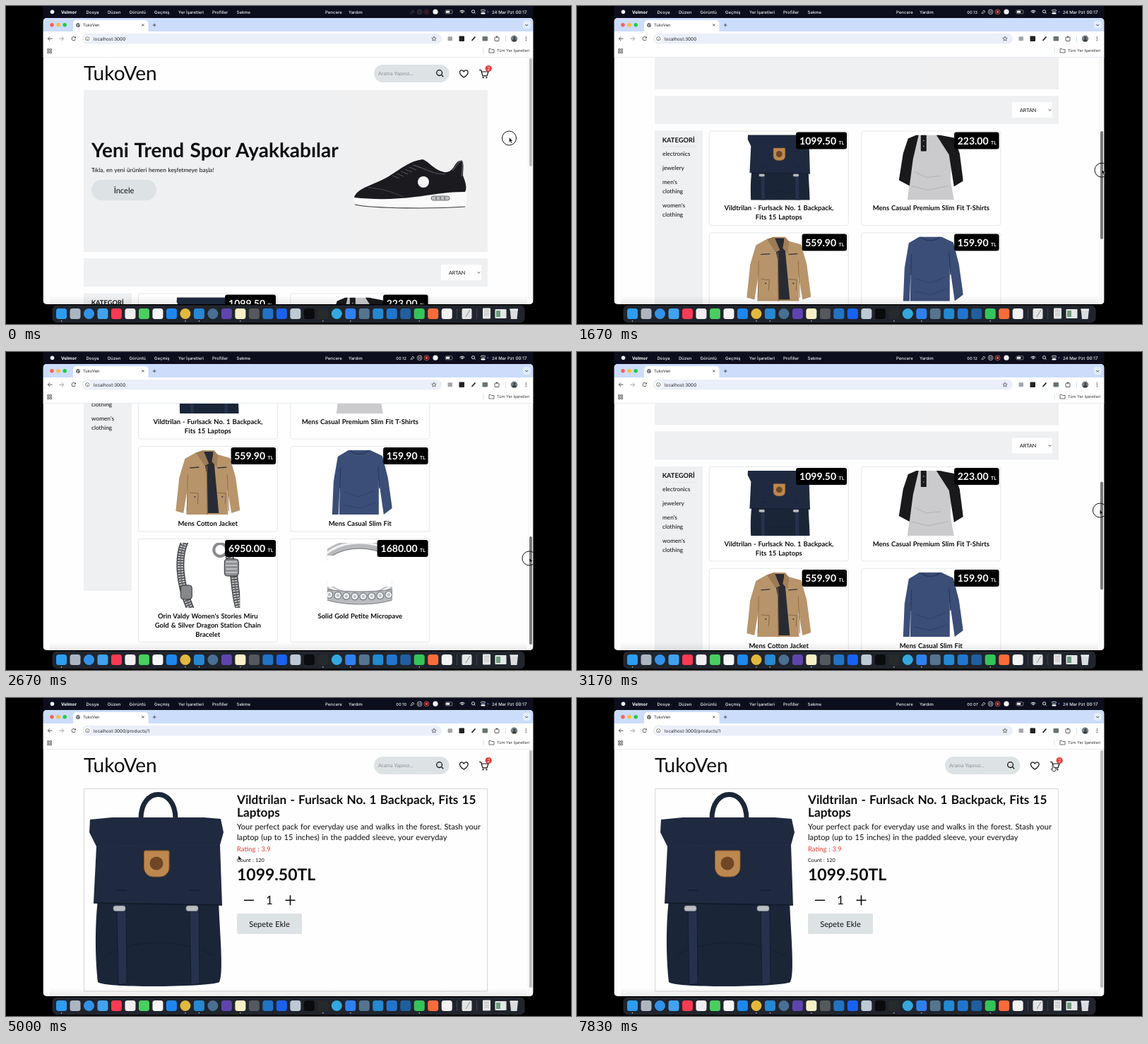
An HTML page with a canvas for the animation above (8000 ms loop, 800 px wide and 450 px high).

```html
<!DOCTYPE html>
<html lang="tr">
<head>
<meta charset="utf-8">
<title>TukoVen</title>
<style>
html, body { margin: 0; width: 100%; height: 100%; overflow: hidden; background: #000; }
canvas { position: absolute; left: 0; top: 0; width: 800px; height: 450px; }
</style>
</head>
<body>
<canvas id="stage"></canvas>
<script>
const stage = document.getElementById('stage');
const c = stage.getContext('2d');
const dpr = window.devicePixelRatio || 1;
stage.width = 800 * dpr;
stage.height = 450 * dpr;

const LOOP = 8000;
const SHOP = 'Lato, sans-serif';
const UI = 'Inter, sans-serif';
const INK = '#0d0d0f', PANEL = '#eef0f2', PILL = '#dde2e5', NAVY = '#1c2639';

// ---------- drawing helpers ----------
function text(s, x, y, size, color = INK, weight = 400, align = 'left', font = SHOP) {
  c.font = `${weight} ${size}px ${font}`;
  c.wordSpacing = font === SHOP ? size * 0.06 + 'px' : '0px';
  c.textAlign = align;
  c.fillStyle = color;
  c.fillText(s, x, y);
}
const ui = (s, x, y, size, color, weight = 400) => text(s, x, y, size, color, weight, 'left', UI);

function paint(fill, stroke, w = 1) {
  if (fill) { c.fillStyle = fill; c.fill(); }
  if (stroke) { c.strokeStyle = stroke; c.lineWidth = w; c.stroke(); }
}
function rect(x, y, w, h, fill, r = 0, stroke, lw) {
  c.beginPath();
  c.roundRect(x, y, w, h, r);
  paint(fill, stroke, lw);
}
function dot(x, y, r, fill, stroke, lw) {
  c.beginPath();
  c.arc(x, y, r, 0, 7);
  paint(fill, stroke, lw);
}
function poly(p, fill, stroke, lw) {
  c.beginPath();
  for (let i = 0; i < p.length; i += 2) c.lineTo(p[i], p[i + 1]);
  if (fill) c.closePath();
  paint(fill, stroke, lw);
}
function curve(x, y, segs, fill, stroke, lw) {
  c.beginPath();
  c.moveTo(x, y);
  for (const s of segs) c.bezierCurveTo(...s);
  paint(fill, stroke, lw);
}
function inside(x, y, w, h, draw) {
  c.save();
  c.beginPath();
  c.rect(x, y, w, h);
  c.clip();
  draw();
  c.restore();
}
function at(x, y, draw, scale = 1) {
  c.save();
  c.translate(x, y);
  c.scale(scale, scale);
  draw();
  c.restore();
}
function glass(x, y, r, color, w) {
  dot(x, y, r, null, color, w);
  poly([x + r * .72, y + r * .72, x + r * 1.45, y + r * 1.45], null, color, w);
}

// Smooth path through [time, ...values] keys, resting at turning points
function follow(keys, t, n) {
  const last = keys.length - 1;
  if (t <= keys[0][0]) return keys[0][n];
  if (t >= keys[last][0]) return keys[last][n];
  let i = 0;
  while (t >= keys[i + 1][0]) i++;
  const rate = k => k < 0 || k >= last ? 0 : (keys[k + 1][n] - keys[k][n]) / (keys[k + 1][0] - keys[k][0]);
  const slope = k => {
    const a = rate(k - 1), b = rate(k);
    return a * b > 0 ? 2 * a * b / (a + b) : 0;
  };
  const h = keys[i + 1][0] - keys[i][0], u = (t - keys[i][0]) / h, v = 1 - u;
  return keys[i][n] * v * v * (1 + 2 * u) + keys[i + 1][n] * u * u * (3 - 2 * u)
    + h * u * v * (slope(i) * v - slope(i + 1) * u);
}

const POINTER = [
  [0, 712.5, 186], [400, 712.5, 186], [900, 741, 124], [1170, 742, 117], [1330, 742, 138],
  [1500, 742.5, 184], [1670, 743, 231], [2170, 742, 305], [2400, 741, 306], [2670, 741, 291],
  [3330, 740, 214], [3450, 735, 215], [3830, 329, 223], [5000, 329, 223], [5900, 398, 304],
  [6750, 398, 304], [7660, 674, 95]
];
const SCROLL = [[1170, 0], [1330, 38], [1500, 122], [1670, 229.5], [2170, 417.5], [2670, 417.5], [3330, 215]];
const SLIDE = [[600, 0], [1130, 1]];

// ---------- pictures ----------
function shoe(body, sole, trim, mark) {
  curve(493, 270, [[490, 280, 500, 285, 520, 285], [560, 287, 620, 287, 648, 284],
    [655, 282, 653, 262, 649, 258], [600, 256, 530, 260, 493, 270]], sole);
  curve(493, 271, [[497, 256, 525, 253, 545, 239], [560, 230, 572, 219, 590, 217],
    [600, 221, 606, 232, 620, 235], [634, 237, 634, 222, 642, 219], [650, 218, 647, 232, 647, 240],
    [651, 250, 653, 258, 650, 263], [620, 263, 600, 268, 580, 270], [550, 274, 520, 274, 493, 271]], body);
  curve(632, 233, [[638, 226, 640, 220, 645, 219], [648, 220, 646, 231, 645, 241]], null, trim, 1.4);
  curve(513, 257, [[530, 258, 548, 263, 562, 270]], null, trim, .8);
  curve(576, 225, [[592, 228, 600, 238, 622, 238]], null, trim, 1.2);
  for (let i = 0; i < 6; i++) poly([547 + i * 6, 240 - i * 3, 557 + i * 6, 244 - i * 3], null, trim, 1);
  dot(591, 249, 8, mark);
}
function blackShoe() {
  shoe('#1b1b1f', '#fafafa', '#55555a', '#f5f5f5');
  curve(494, 281, [[520, 287, 610, 287, 650, 284]], null, '#3a3a3c', 1.2);
  rect(602, 269, 26, 6, '#bfc1c2', 3, '#55575a', .8);
  c.fillStyle = '#88898b';
  for (let i = 0; i < 3; i++) c.fillRect(608 + i * 6, 270, 2, 4);
}
function whiteShoe() {
  shoe('#e2e3e4', '#f3f3f3', '#333438', '#303136');
  curve(494, 270, [[498, 280, 530, 284, 560, 285], [600, 287, 630, 286, 652, 270],
    [648, 283, 630, 288, 600, 286], [560, 287, 500, 287, 494, 270]], '#25262b');
  curve(494, 268, [[540, 271, 590, 262, 650, 262]], null, '#a5a6a8', 1);
  for (let i = 0; i < 9; i++) rect(607 + i * 4.4, 242 - i * .5, 2.4, 4, '#333438');
}

function bag() {
  curve(191, 171, [[191, 125, 240, 125, 240, 171]], null, NAVY, 7);
  curve(130, 285, [[125, 330, 127, 375, 130, 402], [140, 411, 290, 409, 302, 402],
    [309, 390, 302, 325, 301, 285]], '#1b2538');
  poly([119, 172, 150, 169, 280, 169, 304, 171, 308, 190, 303, 208, 306, 293, 124, 290, 128, 210, 118, 190], '#1f2a40');
  poly([124, 290, 306, 293], null, '#111927', 1.5);
  poly([128, 210, 303, 208], null, '#25314a', .7);
  curve(140, 365, [[180, 340, 250, 340, 294, 365]], null, '#151e2e', 1);
  for (const x of [157, 260]) {
    poly([x, 296, x + 13, 296, x + 14, 404, x + 2, 406], '#26324b', '#121a29', .8);
    rect(x - 5, 294, 17, 7.5, '#b9bdc0', 3, '#777b80', .7);
    poly([x, 272, x + 14, 272], null, '#111927', 1);
  }
  rect(195.5, 216, 35.5, 37, '#bd8850', [2, 2, 13, 13], '#8c5c2b', 1);
  dot(213, 234, 9.5, '#6f4725');
}

const thumbs = {
  bag: () => at(99 - 213 * .47, 33 - 234 * .47, bag, .47),
  tee() {
    poly([76, 6, 114, 6, 128, 38, 126, 70, 131, 98, 65, 98, 69, 68, 70, 38], '#cbcbcd');
    poly([78, 6, 66, 11, 59, 32, 53, 70, 68, 78, 73, 40, 81, 6], '#19191b');
    poly([110, 6, 131, 10, 139, 32, 144, 71, 131, 79, 124, 34, 106, 6], '#19191b');
    rect(84, 6, 8, 23, '#1a1a1c', 1);
    dot(88, 14, .7, '#ddd');
    dot(88, 22, .7, '#ddd');
    poly([75, 58, 92, 66, 112, 64], null, '#b4b4b7', 1);
    poly([70, 78, 94, 84, 123, 78], null, '#b4b4b7', 1);
  },
  jacket() {
    poly([82, 9, 92, 6, 107, 6, 112, 12, 130, 17, 138, 45, 144, 91, 132, 95, 126, 60, 127, 97, 68, 97, 70, 58, 64, 95, 53, 92, 58, 45, 66, 18], '#b8946b');
    poly([91, 8, 106, 8, 108, 30, 114, 95, 98, 95, 97, 40], '#282b33');
    poly([82, 10, 92, 6, 100, 25, 94, 28], '#9c7a54');
    poly([107, 6, 113, 13, 111, 30, 104, 22], '#a37f58');
    poly([97, 28, 98, 97], null, '#83633f', 1.2);
    for (const x of [73, 112]) {
      poly([x, 31, x + 13, 30], null, '#353437', 1.3);
      poly([x, 66, x + 12, 67, x + 11, 82], null, '#8a6944', 1);
      dot(x + 7, 72, 1, '#3a3029');
    }
    poly([70, 40, 69, 92], null, '#927049', 1);
    poly([126, 40, 128, 92], null, '#927049', 1);
  },
  shirt() {
    poly([82, 6, 113, 6, 130, 14, 138, 45, 144, 88, 132, 97, 125, 48, 125, 97, 69, 97, 70, 52, 68, 97, 59, 97, 61, 50, 67, 15], '#3b4e77');
    curve(84, 6, [[90, 13, 105, 13, 111, 6]], null, '#2a395b', 1.5);
    poly([71, 30, 70, 60], null, '#2a395b', 1.2);
    poly([124, 28, 126, 60], null, '#2a395b', 1.2);
    poly([76, 65, 96, 72, 119, 63], null, '#324366', 1.2);
    poly([74, 83, 98, 88, 121, 80], null, '#324366', 1.2);
  },
  bracelet() {
    const chain = (x, y, s) => {
      curve(x, y, s, null, '#46484b', 11);
      c.setLineDash([2, 1.6]);
      curve(x, y, s, null, '#c4c6c8', 8);
      c.setLineDash([]);
      curve(x, y, s, null, '#606266', 1.2);
    };
    dot(116, 16, 9, null, '#888a8e', 4);
    chain(66, 4, [[56, 25, 57, 62, 74, 100]]);
    chain(128, 24, [[139, 45, 134, 75, 144, 102]]);
    rect(122, 29, 20, 24, '#8d9094', 4, '#333', 1);
    rect(60, 66, 16, 20, '#85888c', 4, '#333', 1);
    for (let i = 0; i < 4; i++) poly([124, 33 + i * 5, 140, 33 + i * 5], null, '#eee', 1);
  },
  ring() {
    const arc = (y, ry, color, w) => {
      c.beginPath();
      c.ellipse(98, y, 58, ry, 0, 0, 7);
      paint(null, color, w);
    };
    arc(46, 38, '#b7b9bc', 13);
    arc(43, 37, '#f1f2f3', 3);
    arc(52, 38, '#797c80', 1);
    c.fillStyle = '#fff';
    c.fillRect(52, 24, 92, 44);
    curve(52, 72, [[78, 76, 118, 76, 144, 72], [144, 72, 144, 87, 144, 87],
      [118, 95, 78, 95, 52, 87]], '#b9bbbe', '#777a7e', 1);
    for (let i = 0; i < 8; i++) {
      const x = 55 + i * 12, y = 82 - Math.pow((x - 98) / 26, 2);
      dot(x, y, 5, '#eceef0', '#777a7f', 1.2);
      dot(x, y, 2, '#b8bcc2');
    }
  }
};

// ---------- shop page ----------
function header(dx) {
  text('TukoVen', 110 + dx * .08, 105, 28);
  at(dx, 0, () => {
    rect(521, 83, 106.5, 25, PILL, 12.5);
    text('Arama Yapınız...', 527, 98.3, 7.2, '#8b9196');
    glass(613.6, 94.6, 3.9, INK, 1.3);
    curve(648.3, 101, [[640, 96, 642, 90, 646, 91], [647.5, 91.5, 648.3, 93, 648.3, 93],
      [648.3, 93, 649, 91.5, 650.6, 91], [655, 90, 656.5, 96, 648.3, 101]], null, INK, 1.2);
    poly([670, 90.5, 672.5, 90.5, 675, 98.8, 681, 98.8, 683, 93, 673.3, 93], null, INK, 1.2);
    dot(675.6, 101.3, 1.1, INK);
    dot(680.4, 101.3, 1.1, INK);
    dot(683.2, 88.5, 4.6, '#e93838');
    text('2', 683.2, 91, 7, '#fff', 400, 'center');
  });
}

function button(x, y, label, r) {
  rect(x, y, 92, 29, PILL, r);
  text(label, x + 46, y + 18.6, 11.1, INK, 400, 'center');
}

function banner(move) {
  inside(110, 119, 572, 229, () => {
    rect(110, 119, 572, 229, '#eff0f1');
    at(-572 * move, 0, () => {
      rect(480, 119, 202, 229, '#f0f0f1');
      text('Yeni Trend Spor Ayakkabılar', 121, 214, 28, INK, 700);
      text('Tıkla, en yeni ürünleri hemen keşfetmeye başla!', 121, 234.8, 8.3);
      button(121, 246, 'İncele', 14.5);
      blackShoe();
    });
    at(572 * (1 - move), 0, () => {
      rect(489, 119, 193, 229, '#f0f0f1');
      text('Keyfine Zevkine Uygun Tam', 123, 187.5, 28, INK, 700);
      text('Senlik', 123, 214.5, 28, INK, 700);
      ['Ayakkabı , özenerek seçtiğiniz kıyafeti tamamlayan en güzel ve en dikkat çekici detay. Aslında bir',
        'ihtiyaçtan ziyade kendinizi şımartmanın en fonksiyonel yolu. Neden ihtiyacınız olan ayakkabının en',
        'güzeline ve en rahatına sahip olmayasınız ki!'
      ].forEach((s, i) => text(s, 123, 236 + i * 12.8, 8.3));
      button(123, 272.5, 'İncele', 14.5);
      at(8.5, -1, whiteShoe);
    });
  });
}

const CARDS = [
  [0, 406.5, 134.5, 'bag', '1099.50', ['Vildtrilan - Furlsack No. 1 Backpack,', 'Fits 15 Laptops']],
  [1, 406.5, 134.5, 'tee', '223.00', ['Mens Casual Premium Slim Fit T-Shirts']],
  [0, 550.5, 121.5, 'jacket', '559.90', ['Mens Cotton Jacket']],
  [1, 550.5, 121.5, 'shirt', '159.90', ['Mens Casual Slim Fit']],
  [0, 681.5, 147, 'bracelet', '6950.00', ["Orin Valdy Women's Stories Miru", 'Gold & Silver Dragon Station Chain', 'Bracelet']],
  [1, 681.5, 147, 'ring', '1680.00', ['Solid Gold Petite Micropave']]
];

function card([col, y, h, pic, price, lines]) {
  at(187.3 + col * 215.5, y, () => {
    rect(0, .5, 197, h - 1, '#fff', 3, '#e6e7e9', 1);
    inside(52, 6, 92, 92, thumbs[pic]);
    const w = price.length > 6 ? 72 : 63.5;
    rect(194.8 - w, 2, w, 24, '#000', 3);
    text(price, 179.8, 19.3, 14, '#fff', 700, 'right');
    text('TL', 183.3, 19.3, 6.8, '#fff', 700);
    lines.forEach((s, i) => text(s, 98.5, 112.6 + i * 13, 9.5, INK, 700, 'center'));
  });
}

function home(t) {
  const y = follow(SCROLL, t, 1);
  at(0, -y, () => {
    header(0);
    banner(follow(SLIDE, t, 1));
    rect(110, 357, 572, 40, PANEL);
    rect(616, 366, 57, 22, '#fff');
    text('ARTAN', 627, 379.5, 7.2);
    poly([667.6, 376.2, 669.5, 378, 671.4, 376.2], null, '#333', .9);
    rect(110, 406.5, 68, 349, PANEL);
    text('KATEGORİ', 120.7, 423, 9.3, INK, 700);
    rect(121, 428.5, 48, .7, '#d9dcdf');
    ['electronics', 'jewelery', "men's", 'clothing', "women's", 'clothing'].forEach((s, i) =>
      text(s, 121, [441.5, 461.5, 481.5, 494.5, 514.5, 527.5][i], 8.3));
    CARDS.forEach(card);
  });
  scrollbar(74 + y * .448, 153, t > 1000 && t < 3450);
}

function scrollbar(y, h, active) {
  rect(739.5, 73, 7, 349, '#fafafa');
  rect(739.5, 73, .5, 349, '#ececec');
  rect(741, y, 4, h, active ? '#77787a' : '#bcbdbf', 2);
}

function product() {
  header(0);
  rect(110.5, 128.5, 571, 286.5, null, 0, '#d5d6d8', 1);
  bag();
  text('Vildtrilan - Furlsack No. 1 Backpack, Fits 15', 327, 149.5, 17.2, INK, 700);
  text('Laptops', 327, 168, 17.2, INK, 700);
  text('Your perfect pack for everyday use and walks in the forest. Stash your', 327, 186, 11.1);
  text('laptop (up to 15 inches) in the padded sleeve, your everyday', 327, 200.5, 11.1);
  text('Rating : 3.9', 327, 217.3, 9.4, '#e8382d');
  text('Count : 120', 327, 232, 7.3);
  text('1099.50TL', 327, 257.5, 23, INK, 700);
  poly([337, 286.3, 351, 286.3], null, INK, 1.6);
  text('1', 373, 292.3, 17, INK, 400, 'center');
  poly([395.5, 286.3, 409.5, 286.3], null, INK, 1.6);
  poly([402.5, 279.3, 402.5, 293.3], null, INK, 1.6);
  button(327, 305, 'Sepete Ekle', 2);
  scrollbar(74, 336, false);
}

function loading() {
  header(6.3);
  text('Loading ...', 110.3, 127, 7.4, INK, 700);
}

// ---------- desktop ----------
function menubar(t) {
  rect(52.5, 0, 694, 17.5, '#0c0e1d');
  dot(65.5, 8.3, 2.8, '#f4f4f6');
  ui('Velmor', 78, 10.6, 6.3, '#fff', 700);
  const items = { Dosya: 113.5, Düzen: 144, Görüntü: 174.5, Geçmiş: 210, 'Yer İşaretleri': 244, Profiller: 292, Sekme: 326.5, Pencere: 452, Yardım: 485 };
  for (const s in items) ui(s, items[s], 10.6, 6, '#f0f0f4', 500);
  ui('24 Mar Pzt', 688, 10.6, 6, '#f0f0f4', 500);
  ui('00:17', 721.5, 10.6, 6.2, '#f0f0f4', 500);

  const live = Math.min(1, t / 330);
  c.globalAlpha = live;
  const left = Math.min(14, 14 - Math.floor((t - 500) / 1000));
  ui('00:' + String(left).padStart(2, '0'), 552.3, 10.6, 5.6, '#f0f0f4', 500);
  c.globalAlpha = .3 + .7 * live;
  poly([572.5, 11, 576, 6, 578, 8, 574, 11], null, '#ddd', .8);
  dot(585.6, 8.3, 3.3, null, '#ddd', .8);
  poly([584.6, 6.7, 584.6, 9.9], null, '#ddd', .8);
  poly([586.6, 6.7, 586.6, 9.9], null, '#ddd', .8);
  dot(595.5, 8.3, 3.5, null, '#e5635a', .8);
  rect(593.8, 6.6, 3.4, 3.4, '#f05048', 1);
  c.globalAlpha = 1;
  dot(608, 8.2, 3.6, '#f2f2f4');
  rect(622, 5.8, 10, 5, null, 1.5, '#999', .8);
  rect(623, 6.8, 5.2, 3, '#f2f2f4', .5);
  for (const r of [1.6, 3.2, 4.8]) {
    c.beginPath();
    c.arc(646, 11, r, -2.4, -.74);
    paint(null, '#f2f2f4', 1);
  }
  glass(661.5, 7.7, 2.1, '#f2f2f4', .9);
  rect(672.5, 5.2, 6, 2.4, null, 1.2, '#eee', .8);
  rect(672.5, 9, 6, 2.4, '#eee', 1.2);
  dot(682.3, 8.3, 1, '#5367d8');
}

function toolbar(t) {
  rect(52.5, 17, 694, 19.5, '#ccdcfb', [5, 5, 0, 0]);
  ['#ff5f57', '#febc2e', '#28c840'].forEach((f, i) => dot(65 + i * 9.1, 26.8, 2.7, f));
  rect(95, 20, 106.5, 17, '#fff', [5, 5, 0, 0]);
  dot(102, 27, 2.9, '#5f6368');
  poly([100, 25.5, 102, 27, 101.5, 29], null, '#fff', .8);
  poly([103, 24.8, 104, 27], null, '#fff', .7);
  ui('TukoVen', 109, 29.2, 5.8, '#26282b');
  poly([192.2, 25.3, 195.4, 28.5], null, '#333', .8);
  poly([195.4, 25.3, 192.2, 28.5], null, '#333', .8);
  poly([207.8, 27, 212.4, 27], null, '#333', .8);
  poly([210.1, 24.7, 210.1, 29.3], null, '#333', .8);
  rect(732, 21, 10.5, 11, '#e4edfd', 3);
  poly([735.2, 26, 737.2, 28, 739.2, 26], null, '#333', .9);

  rect(52.5, 36, 694, 37, '#fff');
  poly([62, 43.4, 59.4, 46.2, 62, 49], null, '#444', .9);
  poly([59.5, 46.2, 65.5, 46.2], null, '#444', .9);
  poly([79, 43.4, 81.6, 46.2, 79, 49], null, '#999', .9);
  poly([75.5, 46.2, 81.5, 46.2], null, '#999', .9);
  c.beginPath();
  c.arc(95.8, 46.2, 2.7, .3, 5.6);
  paint(null, '#444', .9);
  poly([98.8, 43, 98.8, 45.6, 96.2, 45.6], '#444');
  rect(108, 39, 509, 14.5, '#eaeff9', 7.2);
  dot(115.3, 46.3, 5, '#fff');
  dot(115.3, 46.3, 2.7, null, '#444', .7);
  poly([115.3, 46, 115.3, 47.8], null, '#444', .7);
  ui('localhost:3000' + (t < 4170 ? '' : '/products/1'), 124, 48.6, 6.4, '#26282b');
  const star = [];
  for (let i = 0; i <= 10; i++) {
    const r = i % 2 ? 1.5 : 3.4, a = i * Math.PI / 5 - Math.PI / 2;
    star.push(606 + r * Math.cos(a), 46.4 + r * Math.sin(a));
  }
  poly(star, null, '#444', .7);
  rect(625.5, 43.2, 6.5, 6, '#a3a6ab', 1);
  rect(641.5, 42.5, 7.5, 7.5, '#222', 1);
  poly([659.5, 49, 664.5, 43.5], null, '#222', 1.8);
  rect(674.5, 43, 7.5, 6.5, '#67776d', 1);
  rect(692, 44, 6, 5.5, null, 1, '#444', .9);
  dot(695, 43.6, 1.1, '#444');
  rect(707, 42, .7, 9, '#c5d4f3');
  dot(719.5, 46.3, 4.8, '#77848c');
  dot(719.8, 45, 1.7, '#43403f');
  rect(717, 47, 5.4, 3, '#3b3b40', 1.5);
  for (let i = -1; i < 2; i++) dot(736.3, 46.3 + i * 2.4, .75, '#444');

  for (let i = 0; i < 4; i++) rect(58.7 + i % 2 * 3.6, 60.7 + (i >> 1) * 3.6, 2.3, 2.3, null, 0, '#444', .8);
  rect(675.7, 59, .7, 8.5, '#c5d4f3');
  poly([684, 66, 684, 60.5, 686.5, 60.5, 687.5, 61.5, 691, 61.5, 691, 66, 684, 66], null, '#444', .8);
  ui('Tüm Yer İşaretleri', 695, 65.2, 5.6, '#333');
  rect(52.5, 72, 694, .8, '#dfe4ec');
}

const APPS = ('#2d9df0 #aeb5c2 #3292e8 #42a2ee #f83a53 #f0eeee #48cf5f #f6f6f6 #1d87ef #e2b83f #2688d2 #496f92 #5e45ad ' +
  '#f7efc7 #55585d #2273c4 #1862f0 #bdc9d5 #0b0b0d #252a2d #34a8df #2f80ef #55748f #2389d0 #2076cf #205e9f #34c45a #fa6b3a #f3f3f3').split(' ');
const ROUND = [2, 9, 11, 20];
const RUNNING = [0, 9, 10, 13, 19, 21, 26];

function dock() {
  rect(66, 424, 668, 23.5, '#20242c', 6, '#383c44', .6);
  APPS.forEach((f, i) => {
    const x = 78.5 + i * 19.49;
    if (ROUND.includes(i)) dot(x, 435.5, 7.5, f);
    else rect(x - 7.5, 428, 15, 15, f, 3.5);
    if (RUNNING.includes(i)) dot(x, 445.7, .8, '#d5d5d8');
  });
  rect(638, 428, .6, 15, '#555a63');
  rect(666.5, 428, .6, 15, '#555a63');
  rect(645.5, 428, 14, 15, '#e4e5e6', 2);
  poly([651, 440, 657, 430], null, '#8b8d91', 1);
  rect(675, 427.5, 11, 15, '#e6e7e8', 1);
  for (let i = 0; i < 4; i++) rect(677, 430 + i * 2.5, 7, .7, '#aaa');
  rect(692.5, 429, 16, 13, '#e4e8e6', 1);
  rect(694, 431, 6, 9, '#6f9d7d');
  poly([713.5, 428.5, 725, 428.5, 723.5, 443, 715, 443], '#d9dde0');
  poly([713.5, 429.5, 725, 429.5], null, '#f5f6f7', 1.5);
}

function pointer(t) {
  const x = follow(POINTER, t, 1), y = follow(POINTER, t, 2);
  const pressed = t < 250 || (t > 1300 && t < 3350) || (t > 3800 && t < 4150) || (t > 6330 && t < 6500);
  const hand = (t > 3640 && t < 4170) || (t > 5700 && t < 6950) || t > 7520;
  if (pressed) inside(52.5, 17, 694, 405, () => dot(x, y + 1, 10, null, '#111', 1));
  at(x, y, () => {
    if (hand) poly([-.9, 1, .2, .3, 1, 1.2, 1.2, 3.4, 3.8, 4, 4.2, 6.3, 3.2, 8.5, -.4, 8.5, -2.7, 5.3, -1.8, 4.8, -.7, 5.8, -.9, 1], '#fff', '#111', .8);
    else poly([0, 0, 0, 7, 1.6, 5.6, 2.8, 8.2, 4, 7.6, 2.8, 5.2, 4.9, 5], '#0a0a0a', '#fff', .4);
  });
}

function draw(t) {
  c.setTransform(dpr, 0, 0, dpr, 0, 0);
  c.textRendering = 'geometricPrecision';
  c.lineJoin = 'round';
  c.fillStyle = '#000';
  c.fillRect(0, 0, 800, 450);
  menubar(t);
  c.save();
  c.beginPath();
  c.roundRect(52.5, 17, 694, 405, 5);
  c.clip();
  rect(52.5, 17, 694, 405, '#fefefe');
  inside(52.5, 73, 694, 349, () => {
    if (t < 4170) home(t);
    else if (t < 4670) loading();
    else product();
    const shade = c.createLinearGradient(0, 410, 0, 422);
    shade.addColorStop(0, 'rgba(0,0,0,0)');
    shade.addColorStop(1, 'rgba(0,0,0,.08)');
    c.fillStyle = shade;
    c.fillRect(62, 410, 676, 12);
  });
  toolbar(t);
  c.restore();
  dock();
  pointer(t);
}

const start = performance.now();
function tick(now) {
  draw(Math.max(0, now - start) % LOOP);
  requestAnimationFrame(tick);
}
draw(0);
requestAnimationFrame(tick);
</script>
</body>
</html>
```
